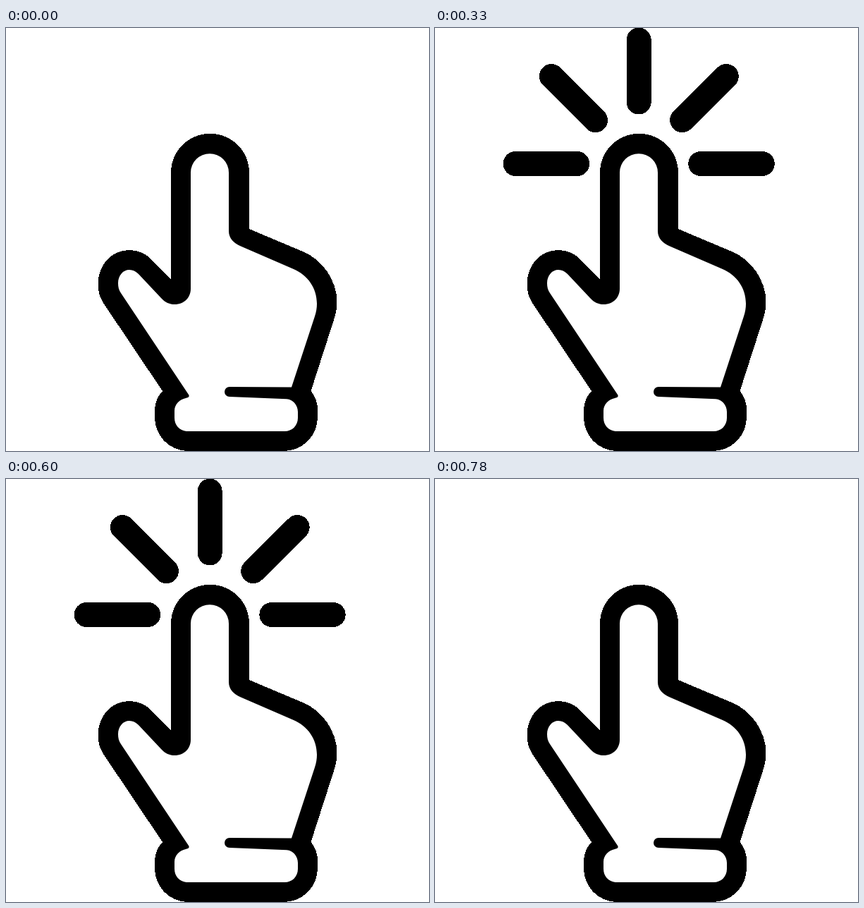
These frames come from a looping animation (600 by 600 pixels, 0.9 s). An HTML page:

```html
<!DOCTYPE html>
<html lang="en">
<head>
<meta charset="utf-8">
<title>Click</title>
<style>
  html, body { margin: 0; width: 100%; height: 100%; overflow: hidden; background: #fff; }
  svg { display: block; width: 100%; height: 100%; }
  .crisp { shape-rendering: crispEdges; }
  #rays { fill: none; stroke: #000; stroke-linecap: round; }
</style>
</head>
<body>
<svg viewBox="0 0 600 600">
  <path class="crisp" d="M234 357 V205 A55.5 55.2 0 0 1 345 205 V285
    L422 317.5 C449 329 469.5 358 469.5 389 C469.5 397 468 405 465.500 412.500
    L432.500 515 C438.500 522 442 531 442 541 V552 C442 579 420 600 394 600
    H259 C232 600 211 579 211 552 V543 C211 532 215 522 222 515
    L138 390 C133 382 130.500 373 130.500 364 C130.500 336 149 315 175 315
    C188 315 199 320 208 330 Z"/>
  <path fill="#fff" d="M262 370 V205 A27 26.700 0 0 1 316 205 V288
    C316 298 323 305.500 333 309.500 L408 342 C428 350.500 441 369 441 391
    C441 397 440 403 438 409 L405 509.500 L317 509 A7 7 0 0 0 317 523
    L398 526.300 C407 527 414 535 414 544.500 V553 C414 564 406 572 395 572
    H258 C247 572 239 564 239 553 V543 C239 533 247 526 257 524.500
    Q261 523.500 259 520 L163 376 C160 372 159 367 159 362
    C159 351 166 343 175 343 C180 343 184 345 188 349
    L220 383 C226 389.500 232 392 239 392 C253 392 262 382 262 370 Z"/>
  <path id="rays" class="crisp" d="M289.200 17 V105 M114.100 192.500 H201.700 M376.800 192.500 H464.200
    M165.300 68.500 L227.500 130.700 M413.200 68.500 L350.700 130.700"/>
</svg>
<script>
  const LOOP = 900, STEP = 30;
  const rays = document.getElementById('rays');

  // The rays pop in and out; their edge swells slightly around the middle.
  function draw(time) {
    const t = Math.floor((time % LOOP) / STEP) * STEP;
    const held = t >= 330 && t < 450 ? 330 : t;
    const swell = Math.max(0, 1 - Math.abs(held - 450) / 300);
    rays.style.visibility = t >= 150 && t < 780 ? 'visible' : 'hidden';
    rays.setAttribute('stroke-width', 34 + 1.8 * swell);
  }

  const start = performance.now();
  function tick() {
    draw(performance.now() - start);
    requestAnimationFrame(tick);
  }
  tick();
</script>
</body>
</html>
```
